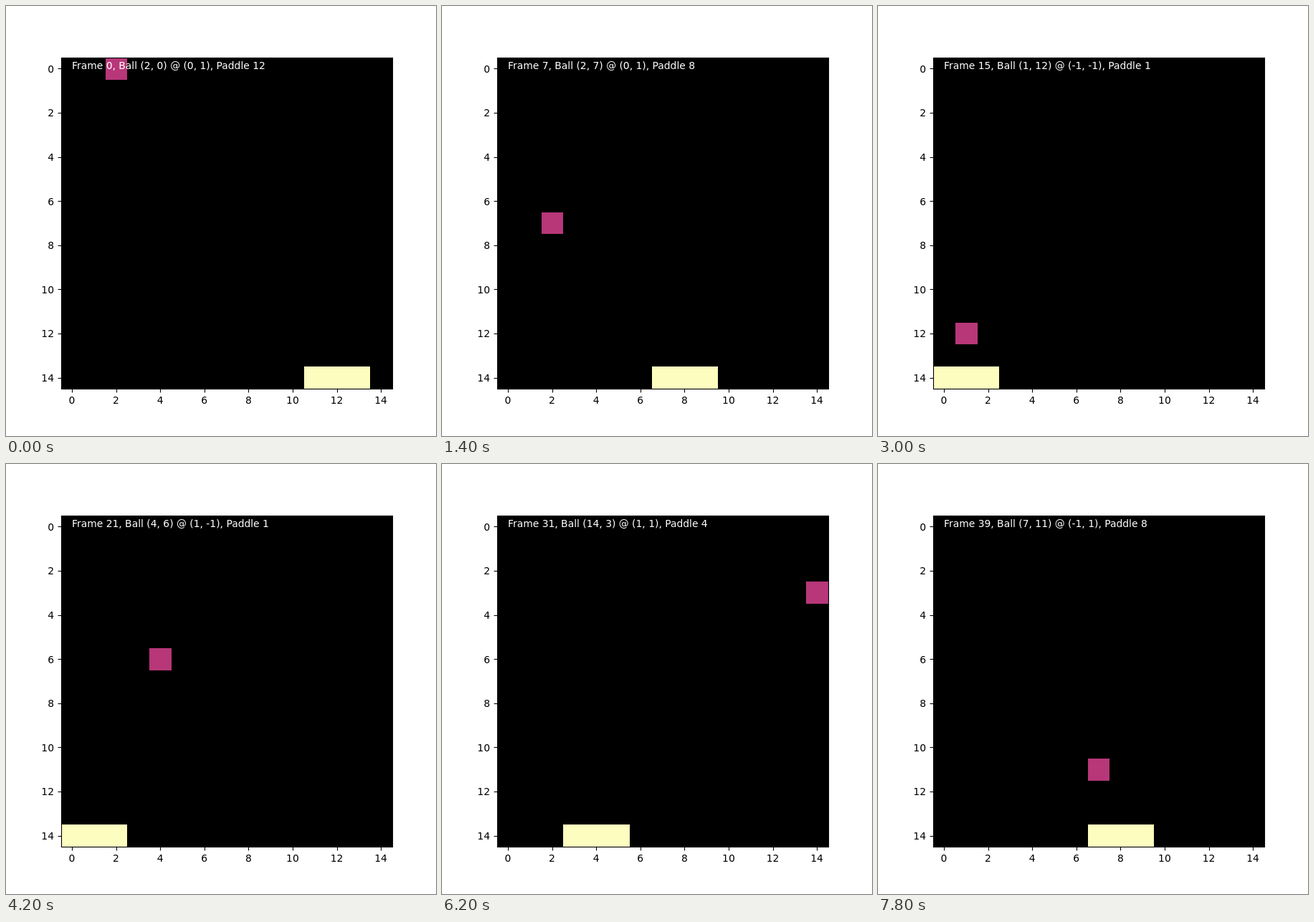
An HTML page with a canvas for the animation above (8000 ms loop, 600 by 600 pixels).

```html
<!DOCTYPE html>
<html lang="en">
<head>
<meta charset="utf-8">
<title>Ball and paddle</title>
<style>
  html, body { margin: 0; width: 100%; height: 100%; overflow: hidden; background: #fff; }
  canvas { display: block; }
</style>
</head>
<body>
<canvas id="stage" width="600" height="600"></canvas>
<script>
const ctx = document.getElementById('stage').getContext('2d');
const STEP = 200, GRID = 15, CELL = 30.8, LEFT = 76.5, TOP = 72;

// Paddle move per step: -, 0 or +
const MOVES = '+0' + '-'.repeat(10) + '0--' + '0'.repeat(7) + '-' +
              '0'.repeat(4) + '+'.repeat(10) + '--';

function simulate() {
  let x = 2, y = 0, dx = 0, dy = 1, paddle = 12;
  const states = [{ x, y, dx, dy, paddle }];
  for (const move of MOVES) {
    x += dx;
    y += dy;
    if (x < 0 || x >= GRID) { x -= dx; dx = -dx; }
    if (y < 0) { y = 0; dy = 1; }
    if (y > GRID - 2) {
      y = GRID - 2;
      dy = -1;
      dx = Math.sign(x - paddle);
    }
    paddle += move === '+' ? 1 : move === '-' ? -1 : 0;
    states.push({ x, y, dx, dy, paddle });
  }
  return states;
}

const states = simulate();

const edgeX = col => Math.ceil(LEFT + col * CELL);
const edgeY = row => Math.round(TOP + row * CELL);

function fillCells(col, row, count, color) {
  const first = Math.max(col, 0), last = Math.min(col + count, GRID);
  ctx.fillStyle = color;
  ctx.fillRect(edgeX(first), edgeY(row),
    edgeX(last) - edgeX(first), edgeY(row + 1) - edgeY(row));
}

function line(x1, y1, x2, y2) {
  ctx.beginPath();
  ctx.moveTo(x1, y1);
  ctx.lineTo(x2, y2);
  ctx.stroke();
}

function drawAxes() {
  ctx.strokeStyle = ctx.fillStyle = '#000';
  ctx.lineWidth = 1.11;
  ctx.strokeRect(77.5, 72.5, 462, 462);
  for (let n = 0; n < GRID; n += 2) {
    const x = LEFT + (n + 0.5) * CELL, y = TOP + (n + 0.5) * CELL;
    const tickX = Math.round(x) + 0.5, tickY = Math.round(y) + 0.5;
    line(tickX, 534.5, tickX, 539.5);
    line(72.5, tickY, 77.5, tickY);
    ctx.textAlign = 'center';
    ctx.fillText(n, x, 555);
    ctx.textAlign = 'right';
    ctx.fillText(n, 67, Math.round(y + 5.3));
  }
}

function draw(index) {
  const s = states[index];
  ctx.font = '13.889px "DejaVu Sans", sans-serif';
  ctx.fillStyle = '#fff';
  ctx.fillRect(0, 0, 600, 600);
  ctx.fillStyle = '#000';
  ctx.fillRect(77, 72, 463, 463);
  fillCells(s.x, s.y, 1, '#b73779');
  fillCells(s.paddle - 1, GRID - 1, 3, '#fcfdbf');
  drawAxes();
  ctx.textAlign = 'left';
  ctx.fillStyle = '#fff';
  ctx.fillText(`Frame ${index}, Ball (${s.x}, ${s.y}) @ (${s.dx}, ${s.dy}), Paddle ${s.paddle}`, 92, 88);
}

const start = performance.now();
function tick() {
  const time = Math.max(0, performance.now() - start);
  draw(Math.floor(time / STEP) % states.length);
  requestAnimationFrame(tick);
}
tick();
</script>
</body>
</html>
```
